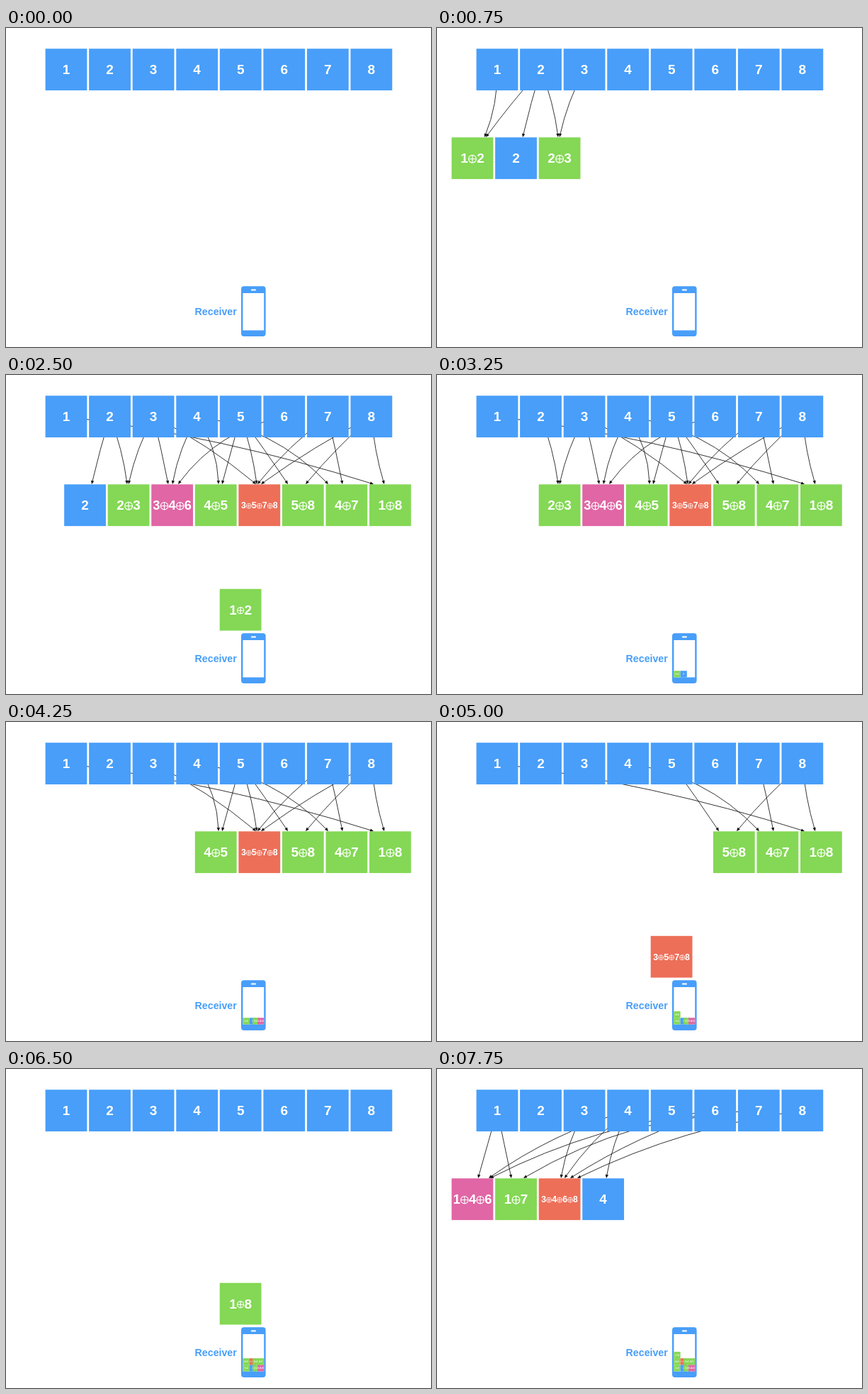
Animation, 600 px wide and 450 px high, one loop 8 s. Source, as an HTML page with a canvas:

```html
<!DOCTYPE html>
<html lang="en">
<head>
<meta charset="utf-8">
<title>Fountain code</title>
<style>
  html, body { margin: 0; width: 100%; height: 100%; overflow: hidden; background: #fff; }
  canvas { display: block; }
</style>
</head>
<body>
<canvas id="stage" width="600" height="450"></canvas>
<script>
const ctx = document.getElementById('stage').getContext('2d');
const STEP_MS = 250, STEPS = 32;
const BLUE = '#489ef9';
const COLORS = [BLUE, '#84d855', '#e066a5', '#ed6f58'];
const FONT_SIZES = [19, 19, 18.3, 12.3];
const FONT = '"Liberation Sans", Arial, sans-serif';
const SIZE = 58.8, PITCH = 61.55;
const SOURCE = { x: 55.6, y: 29.2 }, ENCODED = { x: 20.6, y: 154.3 }, HELD = { x: 301.7, y: 301.8 };

// One arrow [tip x, bow] for each digit of the label.
const block = (label, ...arrows) => ({ digits: label.split('+').map(Number), arrows });

const firstBatch = [
  block('1+2', [67, 10], [69, -3]),
  block('2', [121, -1.5]),
  block('2+3', [171, 6], [173, -7]),
  block('3+4+6', [229, 1], [235, -8.5], [243, -34]),
  block('4+5', [300, 14], [305, 0]),
  block('3+5+7+8', [353, 10], [354, 5], [355, -9], [360, -7]),
  block('5+8', [398, 1], [423, -5]),
  block('4+7', [455, 36], [475, 1]),
  block('1+8', [519, 20], [534, -5])
];
const secondBatch = [
  block('1+4+6', [58, 0], [73, -18], [75, -30]),
  block('1+7', [105, 0], [122, -45]),
  block('3+4+6+8', [175, -8], [180, -10], [188, -15], [198, -27]),
  block('4', [239, -7])
];

function drawXor(x, y, r, width) {
  ctx.lineWidth = width;
  ctx.beginPath();
  ctx.arc(x, y, r, 0, Math.PI * 2);
  ctx.moveTo(x - r, y);
  ctx.lineTo(x + r, y);
  ctx.moveTo(x, y - r);
  ctx.lineTo(x, y + r);
  ctx.stroke();
}

function drawBlock(digits, x, y, scale = 1, opWidth = 0.66) {
  const n = digits.length, size = FONT_SIZES[n - 1];
  const digitW = size * 0.556, opW = size * opWidth;
  ctx.save();
  ctx.translate(x, y);
  ctx.scale(scale, scale);
  ctx.fillStyle = COLORS[n - 1];
  ctx.fillRect(0, 0, SIZE, SIZE);
  ctx.fillStyle = ctx.strokeStyle = '#fff';
  ctx.font = `bold ${size}px ${FONT}`;
  ctx.textAlign = 'center';
  let left = (SIZE - n * digitW - (n - 1) * opW) / 2;
  digits.forEach((digit, i) => {
    if (i) {
      drawXor(left + opW / 2, SIZE / 2 + 1, opW * 0.43, size * 0.06);
      left += opW;
    }
    ctx.fillText(digit, left + digitW / 2, SIZE / 2 + size * 0.355);
    left += digitW;
  });
  ctx.restore();
}

function drawArrow(digit, tipX, bow) {
  const x0 = SOURCE.x + (digit - 1) * PITCH + SIZE / 2, y0 = SOURCE.y + SIZE / 2;
  const tipY = ENCODED.y - 0.3;
  const dx = tipX - x0, dy = tipY - y0, len = Math.hypot(dx, dy);
  const cx = x0 + dx / 2 + bow * dy / len, cy = y0 + dy / 2 - bow * dx / len;
  const angle = Math.atan2(tipY - cy, tipX - cx);
  ctx.strokeStyle = ctx.fillStyle = '#111';
  ctx.lineWidth = 0.85;
  ctx.beginPath();
  ctx.moveTo(x0, y0);
  ctx.quadraticCurveTo(cx, cy, tipX - 3 * Math.cos(angle), tipY - 3 * Math.sin(angle));
  ctx.stroke();
  ctx.save();
  ctx.translate(tipX, tipY);
  ctx.rotate(angle);
  ctx.beginPath();
  ctx.moveTo(0, 0);
  ctx.lineTo(-5, -2.2);
  ctx.lineTo(-5, 2.2);
  ctx.fill();
  ctx.restore();
}

function fillRound(x, y, w, h, r, color) {
  ctx.fillStyle = color;
  ctx.beginPath();
  ctx.roundRect(x, y, w, h, r);
  ctx.fill();
}

function drawPhone(received) {
  fillRound(332, 364.2, 34.6, 70.8, 4, BLUE);
  fillRound(345.8, 368.6, 7.2, 1.9, 1, '#fff');
  ctx.fillStyle = '#fff';
  ctx.fillRect(334.4, 374, 29.8, 52.5);
  const columns = [0, 9.2, 13.8, 20.6], cell = 9.2;
  received.forEach(({ digits }, i) => {
    drawBlock(digits, 334.4 + columns[i % 4], 417.3 - Math.floor(i / 4) * cell, cell / SIZE);
  });
  ctx.fillStyle = BLUE;
  ctx.font = `bold 14.2px ${FONT}`;
  ctx.textAlign = 'left';
  ctx.fillText('Receiver', 266.6, 405);
}

function drawScene(step) {
  const clampCount = n => Math.max(0, Math.min(firstBatch.length, Math.floor(n)));
  const sent = clampCount((step - 8) / 2);
  const received = clampCount((step - 9) / 2);
  const placed = [
    ...firstBatch.slice(0, step).map((item, slot) => ({ ...item, slot })).slice(sent),
    ...secondBatch.slice(0, Math.max(0, step - 27)).map((item, slot) => ({ ...item, slot }))
  ];

  ctx.fillStyle = '#fff';
  ctx.fillRect(0, 0, 600, 450);
  for (const { digits, arrows } of placed)
    digits.forEach((digit, i) => drawArrow(digit, ...arrows[i]));
  for (let i = 0; i < 8; i++) drawBlock([i + 1], SOURCE.x + i * PITCH, SOURCE.y);
  for (const { digits, slot } of placed)
    drawBlock(digits, ENCODED.x + slot * PITCH, ENCODED.y);
  drawPhone(firstBatch.slice(0, received));
  if (sent > received) {
    const { digits } = firstBatch[sent - 1];
    drawBlock(digits, HELD.x, HELD.y, 1, digits.length === 2 ? 0.56 : 0.66);
  }
}

const start = performance.now();
function tick() {
  drawScene(Math.floor((performance.now() - start) / STEP_MS) % STEPS);
  requestAnimationFrame(tick);
}
tick();
</script>
</body>
</html>
```
